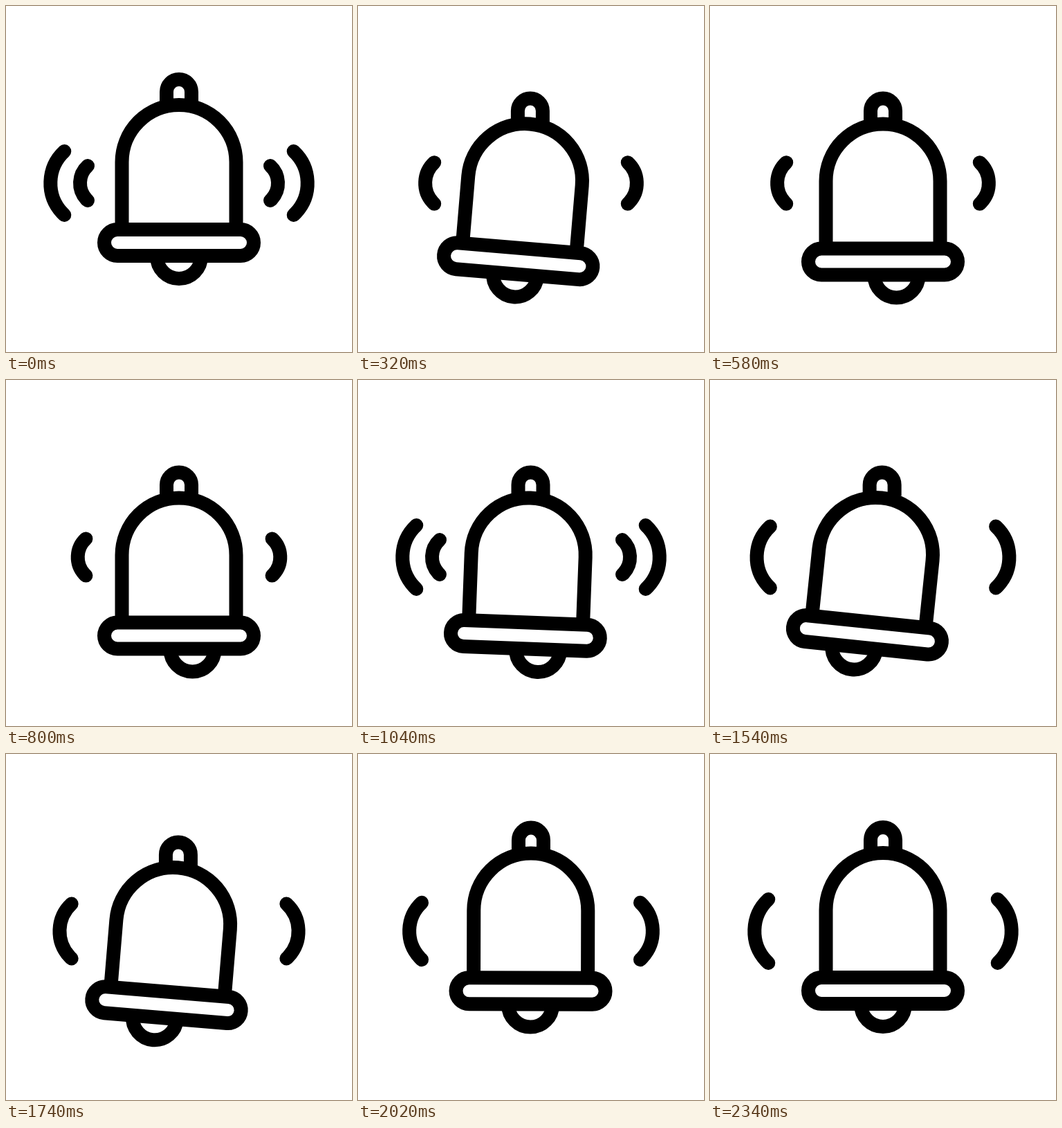
An HTML page with a canvas for the animation above (2.4 s loop, 500 px wide and 500 px high).

```html
<!DOCTYPE html>
<html lang="en">
<head>
<meta charset="utf-8">
<title>Ringing bell</title>
<style>
  html, body { margin: 0; width: 100%; height: 100%; overflow: hidden; background: #fff; }
  canvas { display: block; width: 500px; height: 500px; }
</style>
</head>
<body>
<canvas id="stage" width="500" height="500"></canvas>
<script>
const ctx = document.getElementById('stage').getContext('2d');

const LOOP = 2400, STEP = 20, LAST = 2340;
const WAVE_PERIOD = 260;
const SWING_TIMES = [270, 470, 690, 910, 1130, 1345, 1560];
const REST_TIME = 2080;
const STRIKE_AT = 0.54;
const PIVOT_Y = 124, DROP = 27.5, TILT = 6.1, CLAPPER_SHIFT = 19.8, KNOB_SHIFT = 1.4;

const mix = (a, b, p) => a + (b - a) * p;

// cubic-bezier(.5, 0, .5, 1)
function ease(x) {
  let lo = 0, hi = 1;
  for (let i = 0; i < 24; i++) {
    const s = (lo + hi) / 2;
    if (1.5 * s * (1 - s) + s ** 3 < x) lo = s; else hi = s;
  }
  return lo * lo * (3 - 2 * lo);
}

// drop runs from 0 to 1; tilt and clapper run from -1 to 1.
function bellPose(t) {
  const first = SWING_TIMES[0], last = SWING_TIMES[SWING_TIMES.length - 1];
  if (t < first || t >= last) {
    const k = t < first
      ? ease(t / first)
      : 1 - ease(Math.min(1, (t - last) / (REST_TIME - last)));
    return { drop: k, tilt: k, clapper: -k };
  }
  const i = SWING_TIMES.findIndex(time => time > t) - 1;
  const u = (t - SWING_TIMES[i]) / (SWING_TIMES[i + 1] - SWING_TIMES[i]);
  const side = i % 2 ? -1 : 1;
  // The clapper goes there and back during each swing of the bell.
  const strike = Math.min(u / STRIKE_AT, (1 - u) / (1 - STRIKE_AT));
  return {
    drop: 1,
    tilt: side * mix(1, -1, ease(u)),
    clapper: mix(-1, 1, ease(strike))
  };
}

function stroke(build) {
  ctx.beginPath();
  build();
  ctx.stroke();
}

function drawBell({ drop, tilt, clapper }) {
  ctx.save();
  ctx.translate(250, DROP * drop);
  ctx.lineCap = 'butt';

  // The knob stays upright and only slides a little.
  const knobX = -KNOB_SHIFT * tilt;
  stroke(() => {
    ctx.moveTo(knobX - 18, 140);
    ctx.arc(knobX, 124, 18, Math.PI, 0);
    ctx.lineTo(knobX + 18, 140);
  });

  ctx.translate(0, PIVOT_Y);
  ctx.rotate(TILT * tilt * Math.PI / 180);
  ctx.translate(0, -PIVOT_Y);
  stroke(() => {
    ctx.moveTo(-82.5, 323);
    ctx.arc(0, 225.5, 82.5, Math.PI, 0);
    ctx.lineTo(82.5, 323);
  });
  stroke(() => ctx.roundRect(-108, 323, 216, 38, 19));
  stroke(() => ctx.arc(CLAPPER_SHIFT * clapper, 362, 32, 0, Math.PI));
  ctx.restore();
}

function drawWaves(p) {
  const half = mix(25, 46, p);
  const depth = mix(11, 20, p);
  const reach = mix(143, 185.7, p);
  const radius = (half * half + depth * depth) / (2 * depth);
  const angle = Math.asin(half / radius);
  ctx.lineCap = 'round';
  for (const side of [-1, 1]) {
    ctx.save();
    ctx.translate(250, 256);
    ctx.scale(side, 1);
    stroke(() => ctx.arc(reach - radius, 0, radius, -angle, angle));
    ctx.restore();
  }
}

function draw(now) {
  const t = Math.min(Math.floor((now % LOOP) / STEP) * STEP, LAST);
  ctx.fillStyle = '#fff';
  ctx.fillRect(0, 0, 500, 500);
  ctx.strokeStyle = '#000';
  ctx.lineWidth = 20;

  const phase = t % WAVE_PERIOD;
  if (phase === 0) drawWaves(1);
  if (t < LAST) drawWaves(phase / WAVE_PERIOD);
  drawBell(bellPose(t));
}

let start;
function tick(now) {
  start ??= now;
  draw(now - start);
  requestAnimationFrame(tick);
}
draw(0);
requestAnimationFrame(tick);
</script>
</body>
</html>
```
